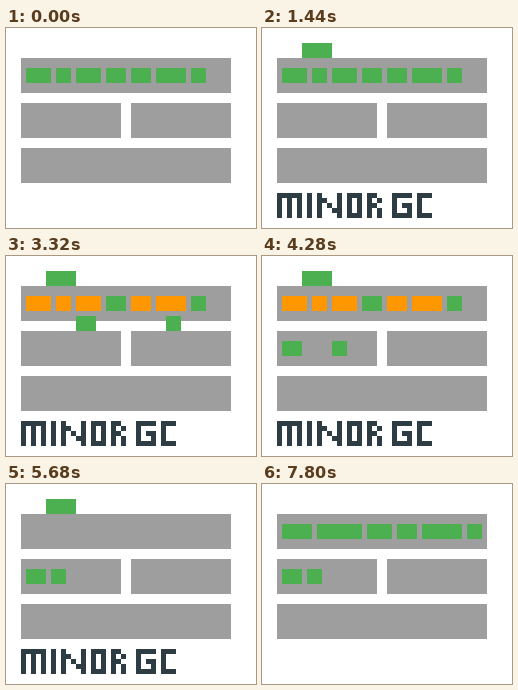
Animation of 250x200 px, one loop 8 s. Source, as an HTML page:

```html
<!DOCTYPE html>
<html lang="en">
<head>
<meta charset="utf-8">
<title>Minor GC</title>
<style>
html, body { margin: 0; width: 100%; height: 100%; overflow: hidden; background: #fff; }
svg { display: block; width: 250px; height: 200px; }
</style>
</head>
<body>
<svg id="stage" viewBox="0 0 250 200" shape-rendering="crispEdges" role="img" aria-label="MINOR GC"></svg>
<script>
const LOOP = 8000, CELL = 5;
const GREY = '#9e9e9e', GREEN = '#4caf50', ORANGE = '#ff9800', INK = '#2e3d44';
const stage = document.getElementById('stage');

function set(el, attrs) {
  for (const name in attrs) el.setAttribute(name, attrs[name]);
}
function box(x, y, width, height, fill) {
  const el = document.createElementNS('http://www.w3.org/2000/svg', 'rect');
  set(el, { x, y, width, height, fill });
  return stage.appendChild(el);
}
function show(el, visible) {
  el.style.display = visible ? '' : 'none';
}
const clamp = (v, low, high) => Math.min(high, Math.max(low, v));
const snap = v => CELL * Math.round(v / CELL);

// Lays objects out from left to right with one cell between them
function pack(x, widths) {
  return widths.map(w => {
    const el = box(x, 40, w, 15, GREEN);
    x += w + CELL;
    return el;
  });
}

// Heap regions: eden, two survivor spaces, old generation
for (let row = 0; row < 3; row++) {
  const parts = row === 1 ? 2 : 1;
  const width = (220 - 10 * parts) / parts;
  for (let i = 0; i < parts; i++) box(15 + i * (width + 10), 30 + 45 * row, width, 35, GREY);
}

const LETTERS = [
  '##### # #   # ### ##   #### ###',
  '# # # # ##  # # # # #  #    #',
  '# # # # # # # # # ##   # ## #',
  '# # # # #  ## # # # #  #  # #',
  '# # # # #   # ### # #  #### ###'
];
const label = [];
LETTERS.forEach((row, r) => [...row].forEach((cell, c) => {
  if (cell === '#') label.push(box(15 + CELL * c, 165 + CELL * r, CELL, CELL, INK));
}));

const eden = pack(20, [25, 15, 25, 20, 20, 30, 15]);
const live = [eden[3], eden[6]];
const garbage = eden.filter(el => !live.includes(el));
const fresh = pack(55, [45, 25, 20, 40, 15]);

const copies = [
  { el: box(100, 40, 20, 15, GREEN), x: i => clamp(100 - 15 * i, 20, 100) },
  { el: box(185, 40, 15, 15, GREEN), x: i => clamp(snap(205 - 22.5 * i), 45, 180) }
];
const incoming = box(0, 0, 30, 15, GREEN);

// Steps last 240 ms, except every twelfth, which lasts 200 ms
const stepStart = k => 240 * k - 40 * Math.floor((k + 5) / 12);
function stepAt(time) {
  let k = 0;
  while (stepStart(k + 1) <= time) k++;
  return k;
}

// Marks objects one per step, beginning at the given step
function mark(objects, k, first) {
  objects.forEach((el, i) => set(el, { fill: k >= first + i ? ORANGE : GREEN }));
}

function render(time) {
  const k = stepAt(time);

  label.forEach(el => show(el, k >= 6 && k < 25));
  eden.forEach(el => show(el, k < 24));
  mark(garbage, k, 7);
  mark(live, k, 22);

  const moved = k - 12;
  copies.forEach(({ el, x }) => {
    show(el, moved > 0);
    set(el, { x: x(moved), y: clamp(40 + 10 * moved, 40, 85) });
  });

  const arrive = Math.min(k, 6);
  const enter = clamp(k - 24, 0, 4);
  set(incoming, {
    x: 10 + CELL * (arrive - enter),
    y: snap(-15 + CELL * arrive + 6.25 * enter)
  });

  fresh.forEach((el, i) => show(el, k >= 29 + i));
}

const began = performance.now();
function tick() {
  render((performance.now() - began) % LOOP);
  requestAnimationFrame(tick);
}
tick();
</script>
</body>
</html>
```
